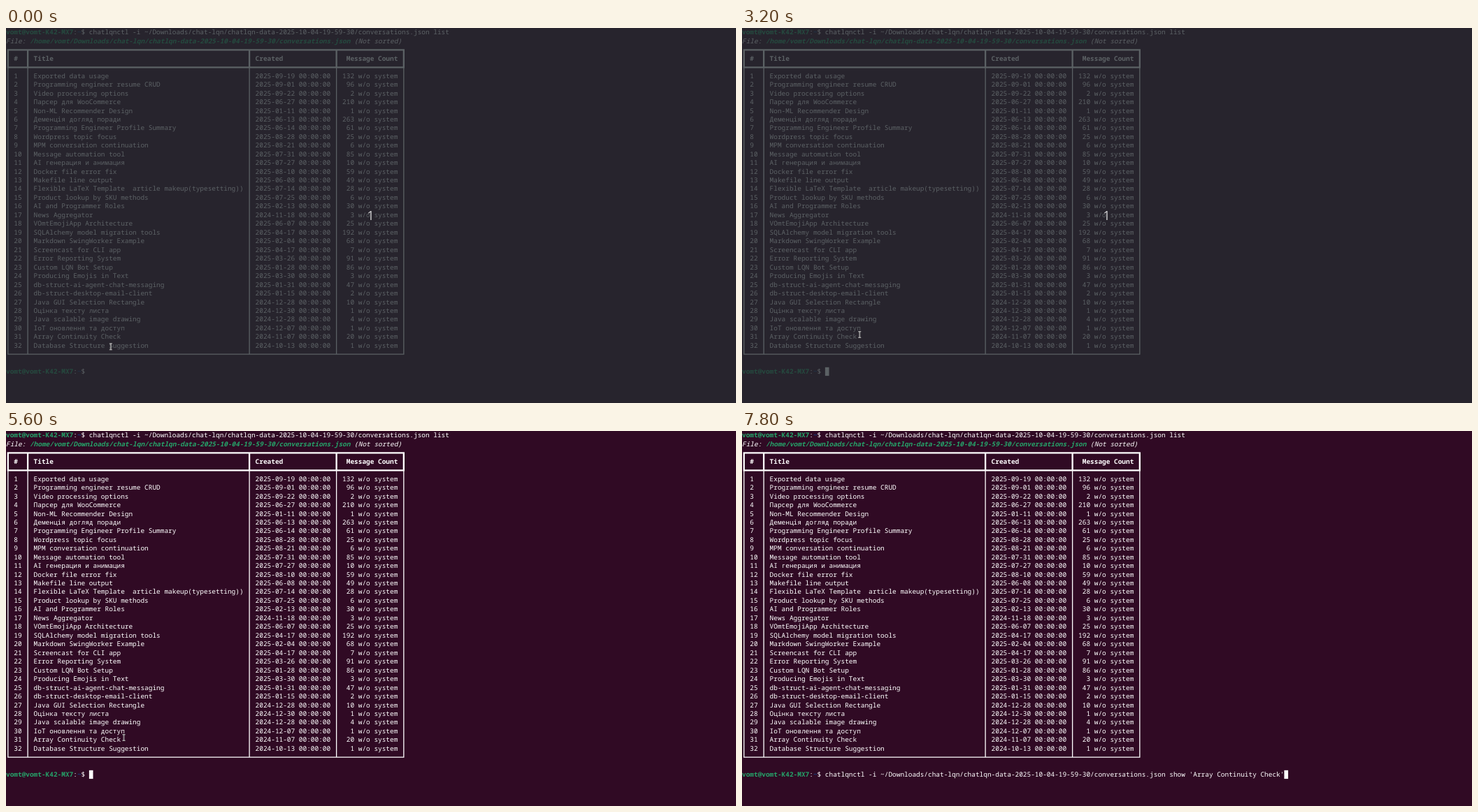
An HTML page that plays this animation: 1044 by 537 pixels, repeating every 8 s.

```html
<!DOCTYPE html>
<html lang="en">
<head>
<meta charset="utf-8">
<title>Conversation list</title>
<style>
  html, body { margin: 0; width: 100%; height: 100%; overflow: hidden; background: #300a24; }
  #stage { position: relative; width: 1044px; height: 537px; overflow: hidden; background: #300a24; }
  #stage > * { position: absolute; left: 0; top: 0; }

  /* The terminal is set on a 12 x 26.4 grid and scaled down as a whole */
  #term {
    top: .3px; margin: 0; color: #fff; white-space: pre;
    font: 20px/26.4px "Noto Sans Mono", "DejaVu Sans Mono", monospace;
    font-variant-ligatures: none; text-rendering: geometricPrecision;
    transform: scale(.47167); transform-origin: 0 0;
  }
  #term b { font-weight: 700; }
  #term i { font-style: italic; }
  .user { color: #26a269; }
  .path { color: #12488b; }
  .typed, #block { position: absolute; top: calc(39 * 26.4px); }
  .typed { left: calc(21 * 12px); }
  #block { width: 12px; height: 26.4px; background: #fff; }

  #shade { width: 100%; height: 100%; background: rgba(37, 45, 49, .75); }
  #count {
    left: 516.5px; top: 256px; width: 10px; text-align: center; color: #d6d6d8;
    font: 17.5px/24px "Open Sans", "Noto Sans", sans-serif;
  }

  #shade, #count { animation: dim 8s step-end infinite; }
  #block { animation: blink 8s step-end infinite, hop 8s step-end infinite; }
  #recall { animation: recall 8s step-end infinite; }
  #show { animation: show 8s step-end infinite; }
  #beam { animation: point 8s step-end infinite; }

  @keyframes dim { 0% { opacity: 1; } 70%, 100% { opacity: 0; } }
  @keyframes blink {
    0%, 13.75%, 28.75%, 43.75%, 58.75%, 73.75%, 90% { opacity: 0; }
    7.5%, 22.5%, 37.5%, 51.25%, 66.25%, 81.25%, 96.25%, 100% { opacity: 1; }
  }
  @keyframes hop {
    0% { left: calc(21 * 12px); }
    96.25% { left: calc(112 * 12px); }
    97.5%, 100% { left: calc(137 * 12px); }
  }
  @keyframes recall { 0%, 97.5%, 100% { opacity: 0; } 96.25% { opacity: 1; } }
  @keyframes show { 0% { opacity: 0; } 97.5%, 100% { opacity: 1; } }
  @keyframes point {
    0% { transform: translate(149.8px, 456.3px); opacity: 1; }
    1.25% { transform: translate(163.5px, 439px); opacity: 1; }
    3.75% { transform: translate(165px, 439px); opacity: 1; }
    5% { transform: translate(166.5px, 439px); opacity: 1; }
    6.25% { transform: translate(167.2px, 439px); opacity: 1; }
    7.5% { transform: translate(167.6px, 439px); opacity: 1; }
    12.5% { transform: translate(168px, 439px); opacity: 1; }
    13.75% { transform: translate(168.2px, 439px); opacity: 1; }
    22.5% { transform: translate(168.5px, 439px); opacity: 1; }
    33.75%, 40% { transform: translate(168.2px, 439px); opacity: 1; }
    35%, 41.25% { transform: translate(168.5px, 439px); opacity: 1; }
    63.75% { transform: translate(168.2px, 439px); opacity: 1; }
    65% { transform: translate(168.5px, 439px); opacity: 1; }
    78.75% { transform: translate(172px, 438.5px); opacity: 1; }
    80% { transform: translate(181px, 444px); opacity: 1; }
    81.25% { transform: translate(187.5px, 453px); opacity: 1; }
    85% { transform: translate(188px, 460px); opacity: 1; }
    86.25% { transform: translate(189px, 468px); opacity: 1; }
    87.5% { transform: translate(189.5px, 472px); opacity: 1; }
    90% { transform: translate(199.5px, 467px); opacity: 1; }
    96.25%, 100% { transform: translate(199.5px, 467px); opacity: 0; }
  }
</style>
</head>
<body>
<div id="stage">
  <svg width="1044" height="537" fill="none" stroke="#fff">
    <path id="heavy" stroke-width="2.3" stroke-linecap="square"/>
    <path id="light" stroke-width="1.3" stroke-linecap="square"/>
  </svg>
  <pre id="term"></pre>
  <div id="shade"></div>
  <div id="count">1</div>
  <svg id="beam" width="1" height="1" overflow="visible" fill="none">
    <path d="M-2 -4.3H2M0 -4.3V4.3M-2 4.3H2" stroke="#222" stroke-opacity=".6" stroke-width="2"/>
    <path d="M-2 -4.3H2M0 -4.3V4.3M-2 4.3H2" stroke="#dedede" stroke-width="1.1"/>
  </svg>
</div>
<script>
  const CELL_W = 5.66, CELL_H = 12.45;
  const file = "Downloads/chat-lqn/chatlqn-data-2025-10-04-19-59-30/conversations.json";
  const command = "chatlqnctl -i ~/" + file;
  const prompt = '<b class="user">vomt@vomt-K42-MX7</b>:<b class="path">~</b>$ ';

  // title | creation date | messages
  const chats = `Exported data usage|2025-09-19|132
Programming engineer resume CRUD|2025-09-01|96
Video processing options|2025-09-22|2
Парсер для WooCommerce|2025-06-27|210
Non-ML Recommender Design|2025-01-11|1
Деменція догляд поради|2025-06-13|263
Programming Engineer Profile Summary|2025-06-14|61
Wordpress topic focus|2025-08-28|25
MPM conversation continuation|2025-08-21|6
Message automation tool|2025-07-31|85
AI генерация и анимация|2025-07-27|10
Docker file error fix|2025-08-10|59
Makefile line output|2025-06-08|49
Flexible LaTeX Template  article makeup(typesetting))|2025-07-14|28
Product lookup by SKU methods|2025-07-25|6
AI and Programmer Roles|2025-02-13|30
News Aggregator|2024-11-18|3
VOmtEmojiApp Architecture|2025-06-07|25
SQLAlchemy model migration tools|2025-04-17|192
Markdown SwingWorker Example|2025-02-04|68
Screencast for CLI app|2025-04-17|7
Error Reporting System|2025-03-26|91
Custom LQN Bot Setup|2025-01-28|86
Producing Emojis in Text|2025-03-30|3
db-struct-ai-agent-chat-messaging|2025-01-31|47
db-struct-desktop-email-client|2025-01-15|2
Java GUI Selection Rectangle|2024-12-28|10
Оцінка тексту листа|2024-12-30|1
Java scalable image drawing|2024-12-28|4
IoT оновлення та доступ|2024-12-07|1
Array Continuity Check|2024-11-07|20
Database Structure Suggestion|2024-10-13|1`.split("\n").map(line => line.split("|"));

  const tableRow = (num, title, created, count) =>
    "  " + String(num).padEnd(5) + title.padEnd(56) + created.padEnd(22) + count.padStart(14);

  const lines = [
    prompt + command + " list",
    `<i>File: <b class="user">/home/vomt/${file}</b> (Not sorted)</i>`,
    "",
    `<b>${tableRow("#", "Title", "Created", "Message Count")}</b>`,
    "",
    ...chats.map(([title, date, n], i) =>
      tableRow(i + 1, title, date + " 00:00:00", n + " w/o system")),
    "",
    "",
    prompt
  ];
  document.getElementById("term").innerHTML = lines.join("\n") +
    `<span class="typed" id="recall">${command} list</span>` +
    `<span class="typed" id="show">${command} show 'Array Continuity Check'</span>` +
    '<span id="block"></span>';

  // Rules run through the middle of their character cells
  const midX = col => (col + .5) * CELL_W;
  const midY = row => (row + .5) * CELL_H + .3;
  const columns = [0, 5, 61, 83, 100];
  const across = row => `M${midX(0)} ${midY(row)}H${midX(100)}`;
  const down = (from, to) =>
    columns.map(col => `M${midX(col)} ${midY(from)}V${midY(to)}`).join("");
  const draw = (id, d) => document.getElementById(id).setAttribute("d", d);
  draw("heavy", across(2) + across(4) + down(2, 4));
  draw("light", across(37) + down(4, 37));
</script>
</body>
</html>
```
